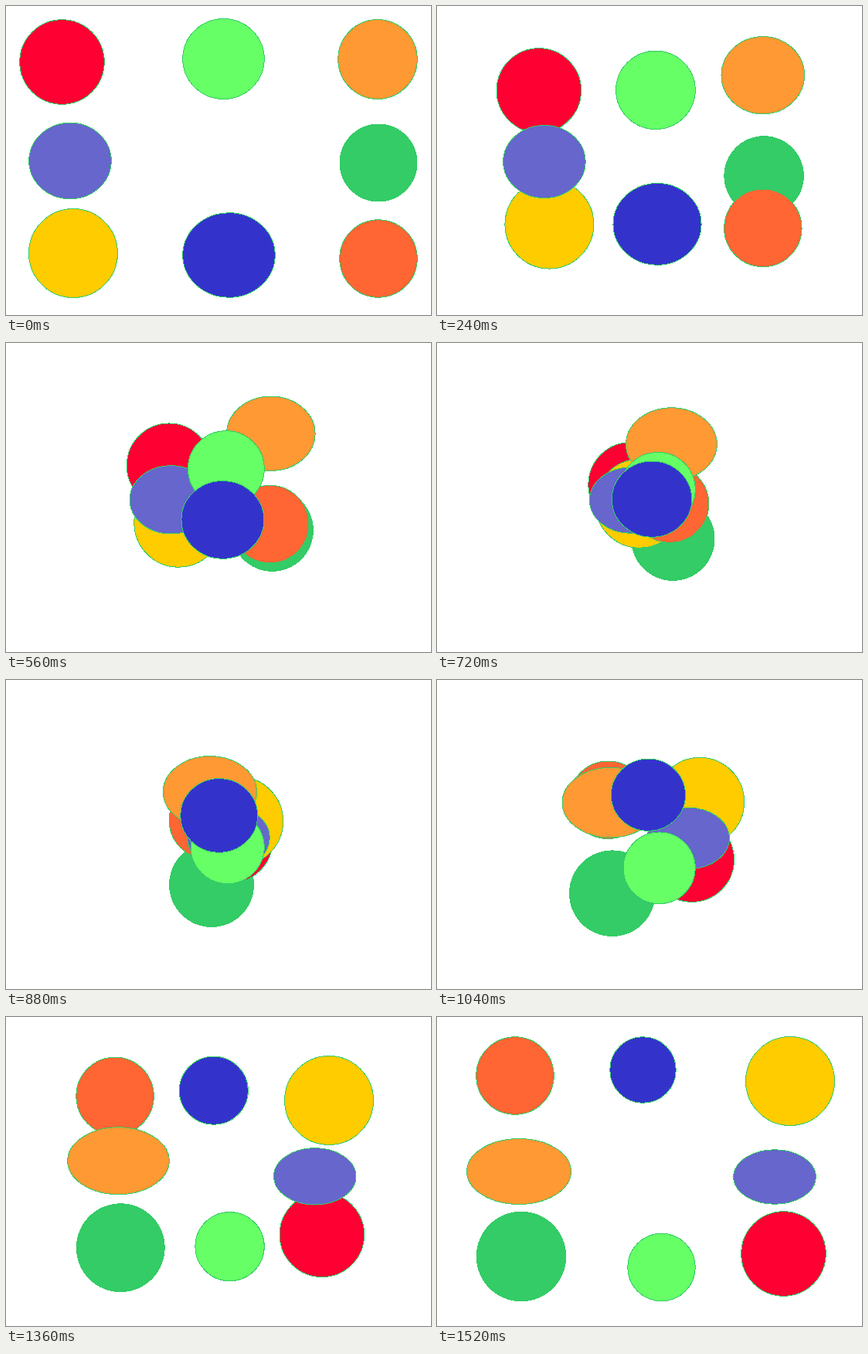
An HTML page that plays this animation: 550 px wide and 400 px high, repeating every 1.6 s.

```html
<!DOCTYPE html>
<html lang="en">
<head>
<meta charset="utf-8">
<title>Crossing circles</title>
<style>
  html, body { margin: 0; width: 100%; height: 100%; overflow: hidden; background: #fff; }
  svg { display: block; width: 550px; height: 400px; shape-rendering: crispEdges; }
  ellipse { stroke: #33cc66; stroke-width: 1px; }
  .plain { stroke: none; }
</style>
</head>
<body>
<svg id="stage" viewBox="0 0 550 400"></svg>
<script>
  const STEPS = 20, STEP_MS = 80;
  const stage = document.getElementById('stage');

  const pose = ([x, y], [w, h = w]) => ({
    cx: x + 'px',
    cy: y + 'px',
    rx: w / 2 + 'px',
    ry: h / 2 + 'px'
  });

  // Moves a disc between two centres, in equal held steps, while its size changes.
  function cross(fill, from, to, size, endSize = size) {
    const disc = document.createElementNS(stage.namespaceURI, 'ellipse');
    disc.setAttribute('fill', fill);
    stage.append(disc);
    disc.animate([pose(from, size), pose(to, endSize)], {
      duration: STEPS * STEP_MS,
      iterations: Infinity,
      easing: `steps(${STEPS}, jump-none)`
    });
    return disc;
  }

  // Bottom to top.
  cross('#33cc66', [482, 203], [109, 310], [101], [116.5]).classList.add('plain');
  cross('#ff0033', [72.5, 72.5], [448.5, 306.5], [109.5]);
  cross('#ffcc00', [87, 320], [457, 83], [115]);
  cross('#ff6633', [482, 327], [101, 76], [100.5]);
  cross('#ff9933', [481, 69], [106, 200], [102.5, 103], [135, 85]);
  cross('#6666cc', [83, 200.5], [437, 207], [106.5, 98.5], [106.5, 70.5]);
  cross('#66ff66', [281.5, 68.5], [290.5, 324], [105.5, 104], [87.5]);
  cross('#3333cc', [288.5, 322.5], [266.5, 68.5], [119.5, 109.5], [85.5]);
</script>
</body>
</html>
```
